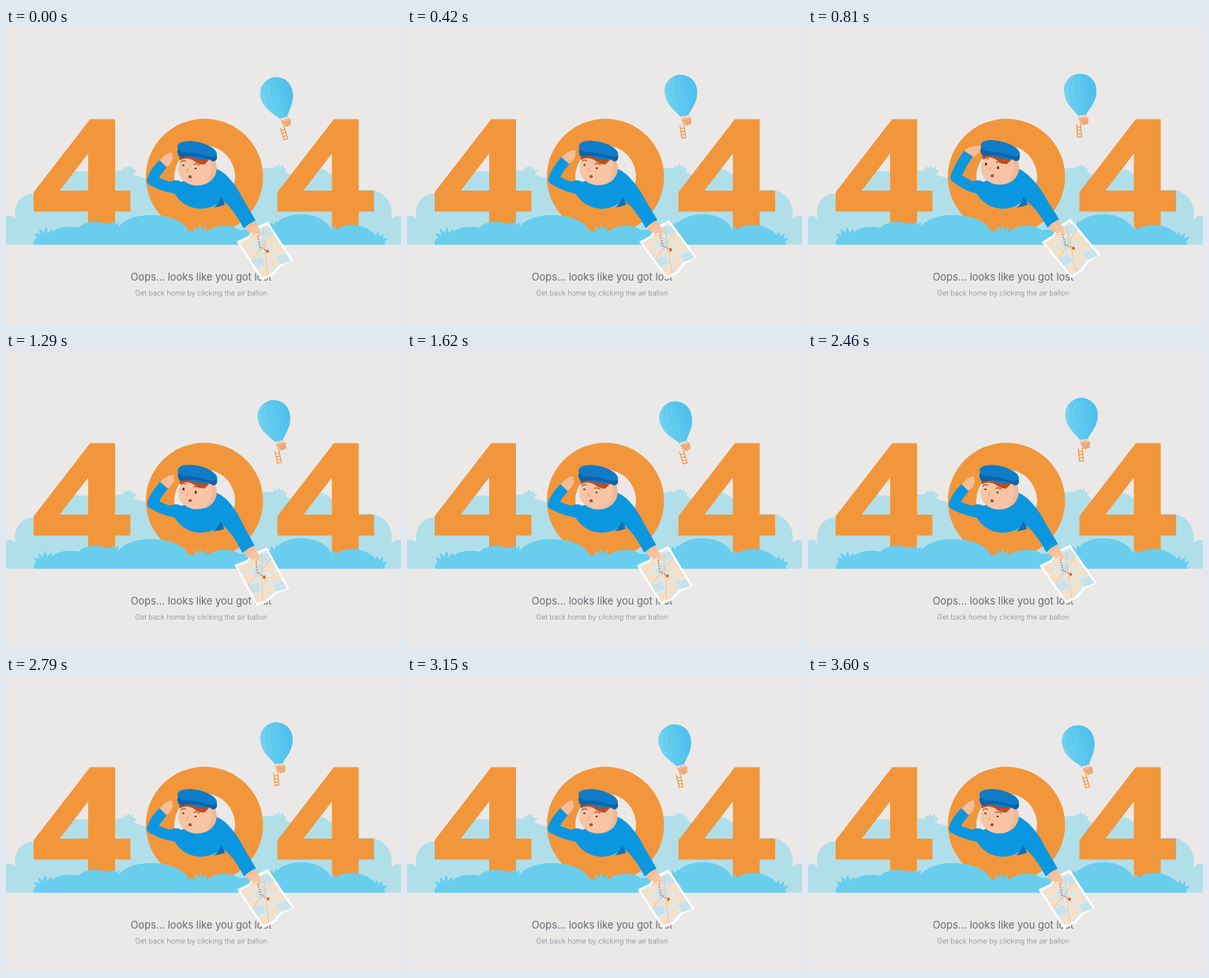
Recreate the animation shown at these times as an HTML page. Size 500 by 375 pixels, loop 3630 ms.

```html
<!DOCTYPE html>
<html lang="en">
<head>
<meta charset="utf-8">
<title>404</title>
<style>
  html, body { margin: 0; width: 100%; height: 100%; overflow: hidden; background: #ebe9e8; }
  svg { display: block; width: 100vw; height: 100vh; }
  text { font-family: Inter, "Open Sans", sans-serif; text-anchor: middle; }
</style>
</head>
<body>
<svg viewBox="0 0 500 375">
  <defs>
    <linearGradient id="silk">
      <stop stop-color="#72d3f1"/><stop offset="1" stop-color="#4bbeed"/>
    </linearGradient>
    <clipPath id="ground"><path d="M0 0H500V274.5H0Z"/></clipPath>
    <path id="four" fill-rule="evenodd" d="M106.500 115.500H138V206H157.500V232.500H138V262H104V232.500H35V208ZM104 159L68 206H104Z"/>
  </defs>

  <g clip-path="url(#ground)">
    <g id="back" fill="#b0dfea">
      <path d="M0 239Q8 236 12 242C8 222 22 208 36 210C44 188 70 180 102 182C130 178 150 180 165 187C185 190 195 205 205 220H268C280 200 300 180 325 178C345 174 357 184 362 188C372 172 405 172 418 192C430 196 440 205 447 206C470 200 492 214 488 242Q494 236 500 239V275H0Z"/>
    </g>
    <g fill="#f2963b">
      <use href="#four"/>
      <use href="#four" x="308.500"/>
      <path fill-rule="evenodd" d="M177 188.500a74.200 73.500 0 1 1 148.400 0a74.200 73.500 0 1 1-148.400 0ZM213 188.500a38.500 39.500 0 1 0 77 0a38.500 39.500 0 1 0-77 0Z"/>
    </g>
    <g id="front" fill="#69ceee">
      <path d="M35 275C35 262 46 263 52 266C56 256 72 249 92 253C100 243 128 243 140 256C146 243 165 237 182 237C210 237 226 246 232 258Q244 257 252 260C262 249 285 248 296 256Q318 254 335 260C340 244 355 236 374 236C395 236 410 246 414 260C420 250 440 246 452 252Q466 256 470 267Q480 268 480 275Z"/>
    </g>
  </g>

  <text x="247" y="320" font-size="12.9" fill="#65696f">Oops... looks like you got lost</text>
  <text x="247" y="338.500" font-size="9" font-weight="300" fill="#85888d">Get back home by clicking the air ballon</text>

  <g id="balloon">
    <path d="M-5 25L-2 32M5 25L6 32M0 26L2 32" stroke="#e9b48c" stroke-width=".7"/>
    <path d="M-5 26C-11 17-20.500 10-20.500-6C-20.500-18-11-26.500 0-26.500S20.500-18 20.500-6C20.500 10 11 17 5 26Z" fill="url(#silk)"/>
    <g fill="none" stroke="#4fbfe6" stroke-width=".7" opacity=".7">
      <path d="M-3 26C-19 2-14-24 0-26.500C14-24 19 2 3 26M-1 26C-9 2-7-20 0-26.500C7-20 9 2 1 26"/>
    </g>
    <path d="M-4.500 29L2 27.500L8 29.500L7 37L1 38.500L-3.500 36.500Z" fill="#f6bd93"/>
    <path d="M-4.500 29L1.500 31L8 29.500L7 37L1 38.500Z" fill="#eea97a"/>
    <path d="M-7.500 37V54M-2.500 37V54M-7.500 41H-2.500M-7.500 45H-2.500M-7.500 49H-2.500M-7.500 53H-2.500" fill="none" stroke="#f0984a" stroke-width="1.200"/>
  </g>

  <path d="M202 198Q214 190 222 195L264 177Q281 184 289 200L276 216Q263 229 247 229Q224 228 213 209L202 206Z" fill="#0b97df"/>
  <g id="reach">
    <path d="M302 252Q308 244 315 245Q321 252 322 262Q316 267 310 263Z" fill="#f5bd98"/>
    <g id="map">
      <g id="sheet" transform="translate(294 271) rotate(-33)"></g>
    </g>
    <path d="M309 252Q317 248 321 254L323 262Q320 265 317 260L313 262Q308 259 309 252Z" fill="#f7c4a1"/>
    <path d="M262 180C281 183 293 202 301 218L316 244Q308 247 301 254C293 239 284 224 268 214Z" fill="#0b97df"/>
    <path d="M272 214Q276 219 277 224Q270 227 263 227Q270 222 272 214Z" fill="#0a70b8"/>
  </g>

  <g id="head">
    <ellipse cx="242" cy="179" rx="24" ry="20.500" fill="#f7c5a5"/>
    <path d="M257 164C264 176 260 192 250 198.500C266 194 270 178 264 167Z" fill="#f3b896"/>
    <path d="M219 160L220 168Q226 163 236 167Q243 173 251 173L257 167L230 155Z" fill="#bd4c20"/>
    <ellipse cx="242" cy="155" rx="25.500" ry="10.500" transform="rotate(13 242 155)" fill="#0f7cc8"/>
    <path d="M218 152C219 160 236 156 250 161Q262 165 267 161Q268 169 262 169C250 162 232 161 221 164Q215 160 218 152Z" fill="#0c64ab"/>
    <g id="brows" fill="none" stroke="#b5562b" stroke-width="1.200">
      <path d="M221 170Q224 167 228 169M237 173Q241 171 245 174"/>
    </g>
    <g fill="#54301f">
      <ellipse class="eye" cx="224.500" cy="174" rx="1.400"/>
      <ellipse class="eye" cx="240" cy="178" rx="1.400"/>
    </g>
    <path d="M231 178Q227 181 231 183" fill="none" stroke="#eca27e" stroke-width="1.200"/>
    <ellipse cx="233" cy="188.500" rx="2.200" ry="1.900" fill="#b34a37"/>
  </g>

  <path id="hand" d="M-4-5Q4-9 16-6Q19-4 15-1Q16 2 10 4Q5 7-3 5Z" fill="#f6bd98"/>
  <path id="sleeve" fill="none" stroke="#0b97df" stroke-width="13.500" stroke-linejoin="round"/>
</svg>
<script>
  const LOOP = 3630, SWING = LOOP / 2;
  const $ = id => document.getElementById(id);
  const set = (el, name, value) => el.setAttribute(name, value);
  const mix = (a, b, k) => a + (b - a) * k;
  const wave = (t, peak) => Math.cos((t - peak) / SWING * 2 * Math.PI);

  function ease(t, from, to) {
    const k = Math.min(1, Math.max(0, (t - from) / (to - from)));
    return k * k * (3 - 2 * k);
  }
  const pulse = (t, rise, top, leave, end) => ease(t, rise, top) - ease(t, leave, end);

  const sprouts = [];
  function sprout(parent, x, y, size) {
    let leaves = "";
    for (let a = -60; a <= 60; a += 30)
      leaves += `<path d="M0 0Q-5-${size / 2} 0-${size}Q5-${size / 2} 0 0Z" transform="rotate(${a})"/>`;
    const el = document.createElementNS("http://www.w3.org/2000/svg", "g");
    el.innerHTML = leaves;
    $(parent).append(el);
    sprouts.push({ el, x, y });
  }
  sprout("back", 155, 186, 12);
  sprout("back", 345, 184, 12);
  sprout("front", 50, 269, 17);
  sprout("front", 136, 258, 14);
  sprout("front", 246, 265, 16);
  sprout("front", 342, 259, 15);
  sprout("front", 415, 265, 15);
  sprout("front", 470, 273, 15);

  // Folded map: a sheet of 44 x 56 with slanted city blocks.
  const sheet = "M0 0L15 2L29-2L44 0V56L29 54L15 58L0 56Z";
  let blocks = "";
  for (let row = 0; row < 4; row++)
    for (let col = 0; col < 3; col++) {
      const x = 1 + col * 14.5, y = 2 + row * 13.5, slant = col % 2 ? -3 : 3;
      blocks += `<path d="M${x} ${y}l13 ${slant}v11l-13 ${-slant}Z" fill="${(row + col) % 3 === 2 ? "#c9e2ea" : "#f3e0c9"}"/>`;
    }
  $("sheet").innerHTML = `<path d="${sheet}" fill="#d8e9ed" stroke="#fff" stroke-width="3"/>${blocks}
    <path d="M1 29L43 14M8 56L36 2" stroke="#f1c79d" fill="none"/>
    <path d="M25 7L19.500 20L24.500 30" fill="none" stroke="#e0623c" stroke-width="1.600" stroke-dasharray="1.600 1.800"/>
    <circle cx="24.500" cy="30" r="1.900" fill="#e2572f"/>`;

  const swayKeys = [[0, 0], [810, 1], [1400, -.9], [1950, .9], [2460, .3], [3150, 0]];
  const eyes = document.querySelectorAll(".eye");

  function draw(t) {
    const x = 343.8 + 3.7 * wave(t, 450), y = 86.7 + 2.2 * wave(t, 1660);
    set($("balloon"), "transform", `translate(${x} ${y}) rotate(${-10.5 - 6.5 * wave(t, 1690)})`);

    sprouts.forEach(({ el, x, y }) =>
      set(el, "transform", `translate(${x} ${y}) rotate(${3 * wave(t, x * 4)})`));

    let sway = 0;
    swayKeys.slice(1).forEach(([end, value], i) => {
      const [start, before] = swayKeys[i];
      sway += (value - before) * ease(t, start, end);
    });
    set($("reach"), "transform", `rotate(${-2 * sway} 270 190)`);
    set($("map"), "transform", `rotate(${-4.5 * sway} 313 257)`);

    const lift = pulse(t, 250, 700, 950, 1450);
    const open = pulse(t, 350, 600, 1350, 1550);
    const elbow = [mix(185, 187, lift), mix(193, 189, lift)];
    const wrist = [mix(199, 203, lift), mix(172, 159, lift)];
    set($("sleeve"), "d", `M222 204Q204 203 ${elbow}Q${elbow[0] + 3} ${elbow[1] - 10} ${wrist}`);
    set($("hand"), "transform", `translate(${wrist}) rotate(${mix(-38, -15, lift)})`);

    set($("head"), "transform", `translate(0 ${-lift}) rotate(${2 * lift} 240 195)`);
    set($("brows"), "transform", `translate(0 ${-1.5 * open})`);
    eyes.forEach(eye => set(eye, "ry", mix(.9, 1.9, open)));
  }

  function frame() {
    draw(performance.now() % LOOP);
    requestAnimationFrame(frame);
  }
  frame();
</script>
</body>
</html>
```
